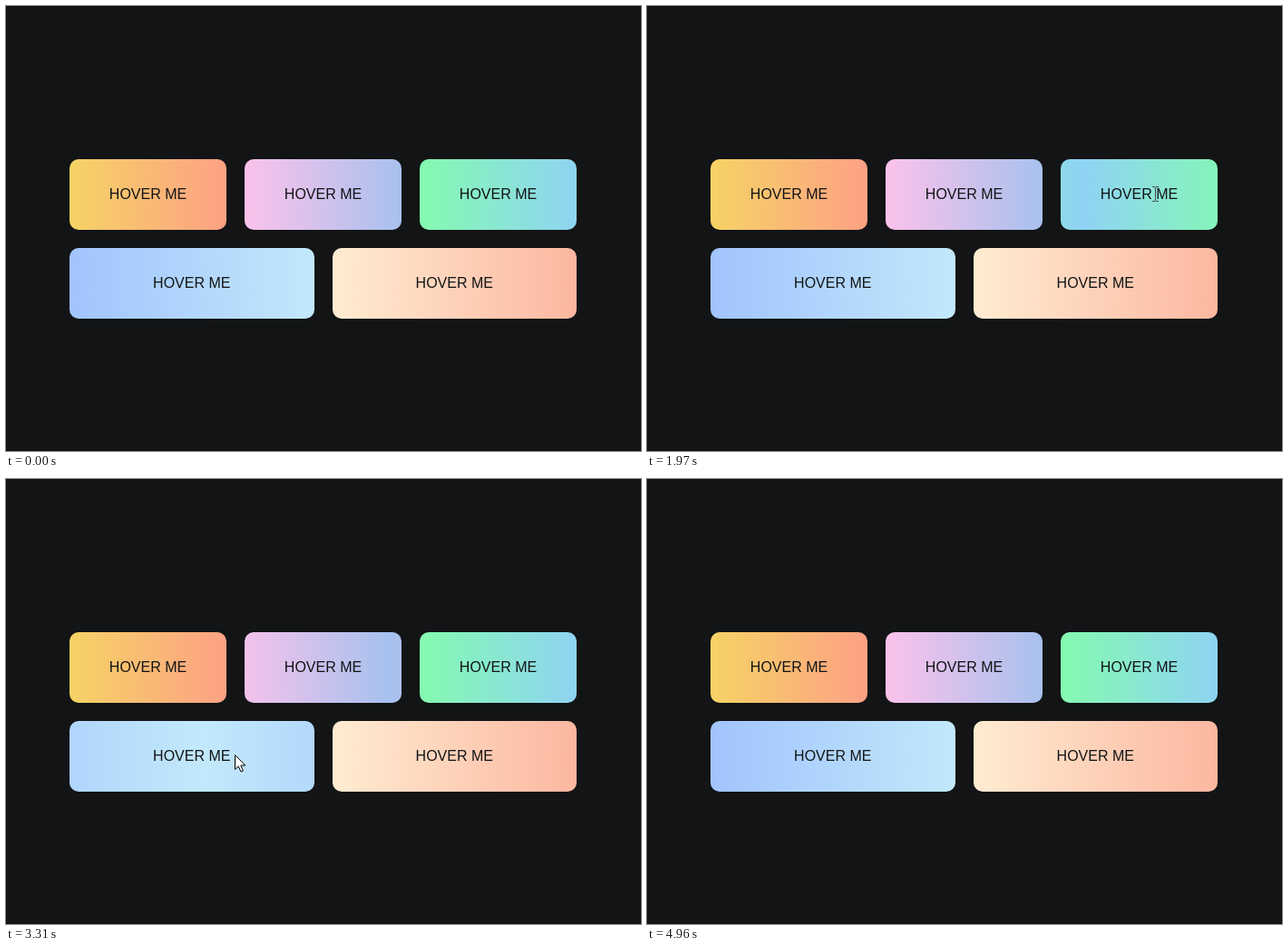
Write an HTML page that moves like this. It is 700 by 491 pixels and loops after 5240 ms.

```html
<!DOCTYPE html>
<html lang="en">
<head>
<meta charset="utf-8">
<title>Gradient buttons</title>
<style>
  html, body { margin: 0; width: 100%; height: 100%; overflow: hidden; background: #121415; }
  #buttons {
    position: absolute; left: 70px; top: 169px; width: 559px;
    display: flex; flex-wrap: wrap; gap: 20px;
  }
  .button {
    flex: 1 0 150px; padding: 30px 0; border-radius: 10px;
    font: 16px/18px "Liberation Sans", Arial, sans-serif;
    text-align: center; color: #121415;
    background-image: linear-gradient(to right, var(--from) 0%, var(--to) 51%, var(--from) 100%);
    background-size: 200% auto;
  }
  #pointer { position: absolute; left: 0; top: 0; width: 700px; height: 491px; }
</style>
</head>
<body>
<div id="buttons">
  <div class="button" style="--from: #f6d365; --to: #fda085">HOVER ME</div>
  <div class="button" style="--from: #fbc2eb; --to: #a6c1ee">HOVER ME</div>
  <div class="button" style="--from: #84fab0; --to: #8fd3f4">HOVER ME</div>
  <div class="button" style="--from: #a1c4fd; --to: #c2e9fb">HOVER ME</div>
  <div class="button" style="--from: #ffecd2; --to: #fcb69f">HOVER ME</div>
</div>
<svg id="pointer" viewBox="0 0 700 491">
  <path id="arrow" d="M.5 .5V16.5L4.2 13L7 19L9.4 18L6.8 12H11.8Z" fill="#fff" stroke="#000"/>
  <path id="beam" d="M-3 -7.5H0M1 -7.5H4M.5 -7V8M-3 8.5H0M1 8.5H4" fill="none" stroke="#4a4446"/>
</svg>
<script>
const LOOP = 5240, START = 1200, END = 4960, STEP = 70, TRANSITION = 500;

// Key points of the pointer's path: time, x, y
const path = [
  [1200, 686, 480], [1480, 688, 336], [1680, 629, 240], [1970, 560, 207],
  [2320, 458, 207], [2360, 434, 204], [2530, 389, 201], [2985, 263, 222],
  [3115, 219, 254], [3300, 252, 304], [4000, 455, 322], [4440, 542, 345],
  [4890, 664, 454]
];

const arrow = document.getElementById('arrow');
const beam = document.getElementById('beam');

// Smooth curve through the key points
function pointerAt(t) {
  const last = path.length - 1;
  let i = 0;
  while (i < last - 1 && path[i + 1][0] < t) i++;
  const a = path[i], b = path[i + 1], span = b[0] - a[0];
  const u = Math.min(1, Math.max(0, (t - a[0]) / span));
  const slope = (k, axis) => {
    const before = path[Math.max(0, k - 1)], after = path[Math.min(last, k + 1)];
    return (after[axis] - before[axis]) / (after[0] - before[0]);
  };
  return [1, 2].map(axis =>
    (1 + 2 * u) * (1 - u) ** 2 * a[axis] + u * u * (3 - 2 * u) * b[axis] +
    span * (u * (1 - u) ** 2 * slope(i, axis) - u * u * (1 - u) * slope(i + 1, axis)));
}

const within = ([x, y], { cx, cy }, halfWidth, halfHeight) =>
  Math.abs(x - cx) < halfWidth && Math.abs(y - cy) < halfHeight;

// Follow the pointer once to learn when it is over each button
const buttons = [...document.querySelectorAll('.button')].map(element => {
  const box = element.getBoundingClientRect();
  const button = { element, cx: box.x + box.width / 2, cy: box.y + box.height / 2 };
  for (let t = START; t < END; t += 2) {
    if (!within(pointerAt(t), button, box.width / 2, box.height / 2)) continue;
    button.enter ??= t;
    button.leave = t;
  }
  return button;
});

// CSS "ease": cubic-bezier(.25, .1, .25, 1)
function ease(x) {
  if (x <= 0) return 0;
  if (x >= 1) return 1;
  const bezier = (s, a, b) => 3 * s * (1 - s) ** 2 * a + 3 * s * s * (1 - s) * b + s ** 3;
  let low = 0, high = 1;
  for (let i = 0; i < 24; i++) {
    const mid = (low + high) / 2;
    if (bezier(mid, .25, .25) < x) low = mid; else high = mid;
  }
  return bezier(low, .1, 1);
}

function hoverAmount({ enter, leave }, t) {
  const rise = ease((Math.min(t, leave) - enter) / TRANSITION);
  return t <= leave ? rise : rise * (1 - ease((t - leave) / (TRANSITION * rise)));
}

function place(shape, visible, [x, y]) {
  shape.style.display = visible ? '' : 'none';
  shape.setAttribute('transform', `translate(${Math.round(x)} ${Math.round(y)})`);
}

function draw(now) {
  const time = now % LOOP;
  const t = START + Math.floor((time - START + 2) / STEP) * STEP;
  for (const button of buttons) {
    button.element.style.backgroundPosition = `${hoverAmount(button, t) * 100}% center`;
  }

  // The pointer first peeks in at the bottom edge
  const peeking = time >= 730 && time < 800;
  const moving = time >= START && time < END;
  const tip = peeking ? [682, 483] : pointerAt(t);
  const overText = buttons.some(button => within(tip, button, 43, 9));
  place(arrow, peeking || moving && !overText, tip);
  place(beam, moving && overText, tip);
  requestAnimationFrame(() => draw(performance.now()));
}
draw(0);
</script>
</body>
</html>
```
